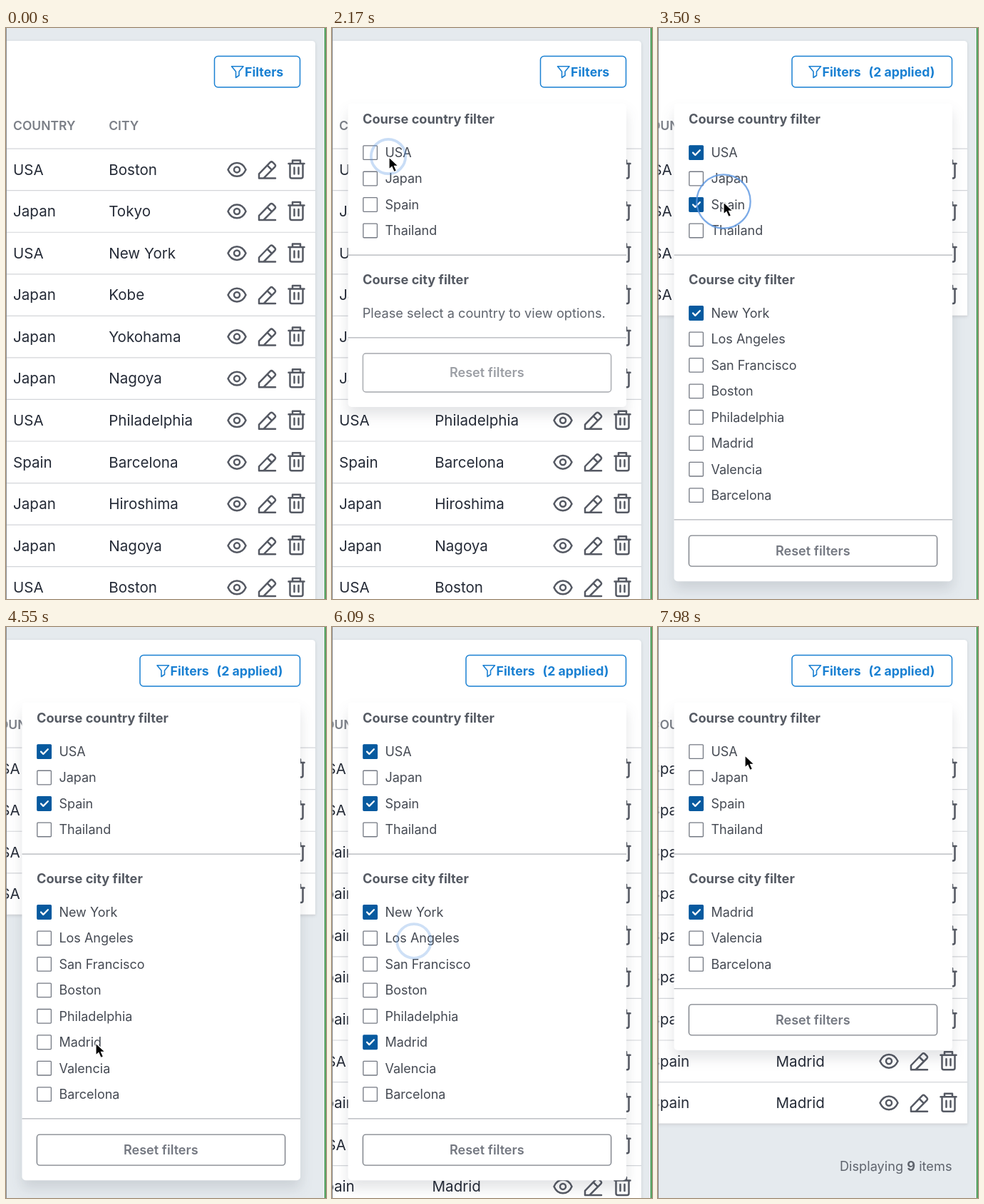
Animation of 449x800 px, one loop 8000 ms. Source, as an HTML page:

```html
<!DOCTYPE html>
<html lang="en">
<head>
<meta charset="utf-8">
<title>Course filters</title>
<style>
html, body { margin: 0; width: 100%; height: 100%; overflow: hidden; background: #e5eaee; }
svg { display: block; width: 449px; height: 800px; font-family: Inter, Roboto, sans-serif; }
.cell { font-size: 20.6px; fill: #252b37; }
.head { font-size: 17.5px; font-weight: 600; fill: #7b7f87; }
.opt { font-size: 18px; fill: #454a53; }
.note { font-size: 18.2px; fill: #5f646d; }
.title { font-size: 18.2px; font-weight: 650; fill: #555a63; }
.blue { font-size: 17.7px; font-weight: 650; fill: #1a80d2; }
.reset { font-size: 18.1px; font-weight: 600; text-anchor: middle; }
.icon { fill: none; stroke: #555963; stroke-width: 2.5; stroke-linejoin: round; stroke-linecap: round; }
.shade { filter: drop-shadow(0 11px 9px rgba(40, 50, 60, .13)); }
.card { filter: drop-shadow(0 1px 2px rgba(40, 50, 60, .14)); }
</style>
</head>
<body>
<svg viewBox="0 0 449 800">
  <defs>
    <g id="tools" class="icon">
      <path d="M311.5 0C317-12.5 331-12.5 336.500 0C331 12.500 317 12.500 311.500 0Z"/>
      <circle cx="324" cy="0" r="4"/>
      <path d="M355 12V6L370.500-10Q372.500-12 374.500-10L377-7.500Q379-5.500 377-3.500L361.500 12ZM366.500-6L373 .5M362 12H378"/>
      <path d="M396.500-8.500H418.500M402-8.500V-13H413V-8.500M398.500-8.500V9.500Q398.500 12 401 12H414Q416.500 12 416.500 9.500V-8.500M404.500-3V6M410.500-3V6"/>
    </g>
  </defs>
  <rect width="449" height="800" fill="#e5eaee"/>
  <g id="table"></g>
  <g id="button"></g>
  <g id="panel"></g>
  <g id="tip">
    <path d="M254 0H449V27H260Q254 27 254 21ZM347 27L352 31L357 27Z" fill="#f3f4f5"/>
    <text x="265" y="13" class="note">Click to reveal filters</text>
  </g>
  <rect width="1" height="800" fill="#8b8f93"/>
  <rect x="447" width="1.500" height="800" fill="#1b8427"/>
  <circle id="ring" fill="none"/>
  <path id="cursor" d="M0 0V17L4 13.500L7 20.500L10.500 19L7.500 12.300H13Z" fill="#000" stroke="#fff" stroke-width="1.200"/>
</svg>
<script>
const LOOP = 8000, STEP = 58.55, OPT = 36.45;
const $ = id => document.getElementById(id);
const text = (x, y, cls, s, more = '') => `<text x="${x}" y="${y}" class="${cls}" ${more}>${s}</text>`;
const line = (y, x1, x2, c) => `<path d="M${x1} ${y}H${x2}" stroke="${c}" stroke-width="1.2"/>`;
const box = (x, y, w, h, r, more) => `<rect x="${x}" y="${y}" width="${w}" height="${h}" rx="${r}" ${more}/>`;

const nations = ['USA', 'Japan', 'Spain', 'Thailand'];
const cities = {
  USA: ['New York', 'Los Angeles', 'San Francisco', 'Boston', 'Philadelphia'],
  Spain: ['Madrid', 'Valencia', 'Barcelona']
};
const row = s => [s.startsWith('U') ? 'USA' : s.startsWith('J') ? 'Japan' : 'Spain', s.slice(2)];
const list = s => s.split(',').map(row);
const mixed = [...'UUSSSSSUSUSSS'].map(c => row(c + (c === 'U' ? ' New York' : ' Madrid')));

// start, rows, country x, city x
const tables = [
  [0, list('U Boston,J Tokyo,U New York,J Kobe,J Yokohama,J Nagoya,U Philadelphia,S Barcelona,J Hiroshima,J Nagoya,U Boston,J Tokyo'), 10, 144.2],
  [2350, list('U Boston,U New York,U Philadelphia,U Boston,U New York,U San Francisco,U Los Angeles,U New York,U Boston,U New York,U Philadelphia,U Boston'), 10, 144.2],
  [2900, mixed.filter(r => r[0] === 'USA'), -23, 140.5],
  [4950, mixed, -23, 140.5],
  [7270, mixed.filter(r => r[0] === 'Spain'), -10.5, 165.5]
];
// start, chosen countries, chosen cities
const choices = [
  [0, [], []],
  [2250, ['USA'], []],
  [2800, ['USA'], ['New York']],
  [3180, ['USA', 'Spain'], ['New York']],
  [4850, ['USA', 'Spain'], ['New York', 'Madrid']],
  [6200, ['USA', 'Spain'], ['New York', 'Los Angeles', 'Madrid']],
  [7150, ['Spain'], ['Madrid']]
];
// start, x, y
const clicks = [
  [1220, 378, 62], [2110, 79, 180], [2650, 88, 404], [3060, 92, 243],
  [4700, 126, 583], [6040, 115, 440], [7020, 122, 181]
];
// time, x, y
const route = [
  [250, 330, 806], [950, 378, 62], [1500, 378, 62], [2050, 80, 181], [2260, 80, 181],
  [2620, 88, 406], [2800, 88, 406], [3040, 92, 244], [3960, 92, 244], [4480, 126, 583],
  [5600, 126, 583], [5880, 115, 440], [6300, 115, 440], [6950, 122, 180], [8000, 122, 180]
];
const hidden = [[0, 250], [1200, 1450], [5900, 6250]];

const at = (track, t) => track.filter(k => k[0] <= t).pop();
const within = (t, a, b) => t >= a && t < b;

function drawTable([, rows, x1, x2]) {
  const end = 169.2 + STEP * rows.length;
  let s = `<path class="card" d="M-10 18H429Q434 18 434 23V${end}H-10Z" fill="#fff"/>`;
  s += text(x1, 142.5, 'head', 'COUNTRY') + text(x2, 142.5, 'head', 'CITY') + line(169.2, 0, 434, '#d3d5d9');
  rows.forEach(([country, city], i) => {
    const y = 198.4 + STEP * i;
    s += text(x1, y + 7.3, 'cell', country) + text(x2, y + 7.3, 'cell', city);
    s += `<use href="#tools" y="${y}"/>` + line(y + 29.3, 0, 434, '#d3d5d9');
  });
  return s + text(412.5, end + 65.5, 'note', `Displaying <tspan font-weight="700">${rows.length}</tspan> items`, 'text-anchor="end"');
}

function drawButton(count, hover, focus) {
  const x = count ? (count > 1 ? 188 : 191) : 292.5;
  let s = focus ? box(x - 3.5, 36.3, 419.5 - x, 50.4, 7, 'fill="#fff" stroke="#1a80d2" stroke-width="1.3"') : '';
  s += box(x, 39.6, 412.5 - x, 43.4, 5, `fill="${hover ? '#d9eafa' : '#fff'}" stroke="#1a80d2" stroke-width="1.5"`);
  s += `<path transform="translate(${x + 24} 53)" d="M0 .8H16.500L10.500 8V13.500L6 16.500V8Z" fill="none" stroke="#1a80d2" stroke-width="1.600" stroke-linejoin="round"/>`;
  s += text(x + 42.6, 67.7, 'blue', 'Filters');
  return s + (count ? text(x + 107.5, 67.7, 'blue', `(${count} applied)`) : '');
}

function option(label, y, on) {
  const paint = on ? 'fill="#075a9f" stroke="#075a9f"' : 'fill="#fff" stroke="#747983"';
  return box(43.8, y - 9.8, 19.6, 19.6, 1, paint + ' stroke-width="1.3"') +
    (on ? `<path d="M49 ${y}l3.300 3.400l6.500-6.700" fill="none" stroke="#fff" stroke-width="2.300" stroke-linecap="round" stroke-linejoin="round"/>` : '') +
    text(74.4, y + 6.4, 'opt', label);
}

function drawPanel([, countries, picked]) {
  const names = countries.flatMap(c => cities[c]);
  const rule = 433.8 + OPT * Math.max(0, names.length - 1);
  const high = names.length ? 43 : 54, top = rule + 22.2;
  let s = box(22.5, 106, 390.5, top + high + 21 - 106, 5, 'fill="#fff" class="shade"');
  s += text(43, 134, 'title', 'Course country filter');
  nations.forEach((n, i) => s += option(n, 174.6 + OPT * i, countries.includes(n)));
  s += line(318.2, 22.5, 413, '#afb2b7') + text(43, 359, 'title', 'Course city filter');
  names.forEach((n, i) => s += option(n, 399.5 + OPT * i, picked.includes(n)));
  if (!names.length) s += text(42.7, 406, 'note', 'Please select a country to view options.');
  s += line(rule, 22.5, 413, '#afb2b7');
  s += box(43.4, top, 348.2, high, 4, `fill="#fff" stroke="${names.length ? '#7c8088' : '#a5a8ad'}" stroke-width="1.4"`);
  return s + text(217.3, top + high / 2 + 6.3, 'reset', 'Reset filters', `fill="${names.length ? '#747881' : '#9c9fa5'}"`);
}

const shown = {};
function put(id, key, draw) {
  if (shown[id] === key) return;
  shown[id] = key;
  $(id).innerHTML = draw();
}

function place(t) {
  const i = route.findIndex(k => k[0] > t);
  if (i < 1) return route[0].slice(1);
  const [t0, x0, y0] = route[i - 1], [t1, x1, y1] = route[i];
  const p = (t - t0) / (t1 - t0), e = p * p * (3 - 2 * p);
  return [x0 + (x1 - x0) * e, y0 + (y1 - y0) * e];
}

function frame(now) {
  const t = now % LOOP;
  const table = at(tables, t), choice = at(choices, t);
  const count = (choice[1].length > 0) + (choice[2].length > 0);
  const hover = within(t, 940, 1600), focus = within(t, 1250, 2110), open = t >= 1480;
  put('table', table[0], () => drawTable(table));
  put('button', [count, hover, focus].join(), () => drawButton(count, hover, focus));
  put('panel', open ? choice[0] : -1, () => open ? drawPanel(choice) : '');
  $('tip').style.display = within(t, 1050, 1600) ? '' : 'none';

  const [x, y] = place(t);
  $('cursor').setAttribute('transform', `translate(${x} ${y})`);
  $('cursor').style.display = hidden.some(h => within(t, ...h)) ? 'none' : '';

  const click = at(clicks, t), p = click ? (t - click[0]) / 520 : 1;
  const ring = $('ring');
  ring.style.display = p < 1 ? '' : 'none';
  if (p < 1) {
    const set = { cx: click[1], cy: click[2], r: 22 + 18.500 * p, 'stroke-width': 4 - 2 * p,
      stroke: '#5c97e2', 'stroke-opacity': Math.min(.8, .14 + 1.6 * p) * Math.min(1, (1 - p) * 8) };
    for (const k in set) ring.setAttribute(k, set[k]);
  }
  requestAnimationFrame(frame);
}
frame(performance.now());
</script>
</body>
</html>
```
